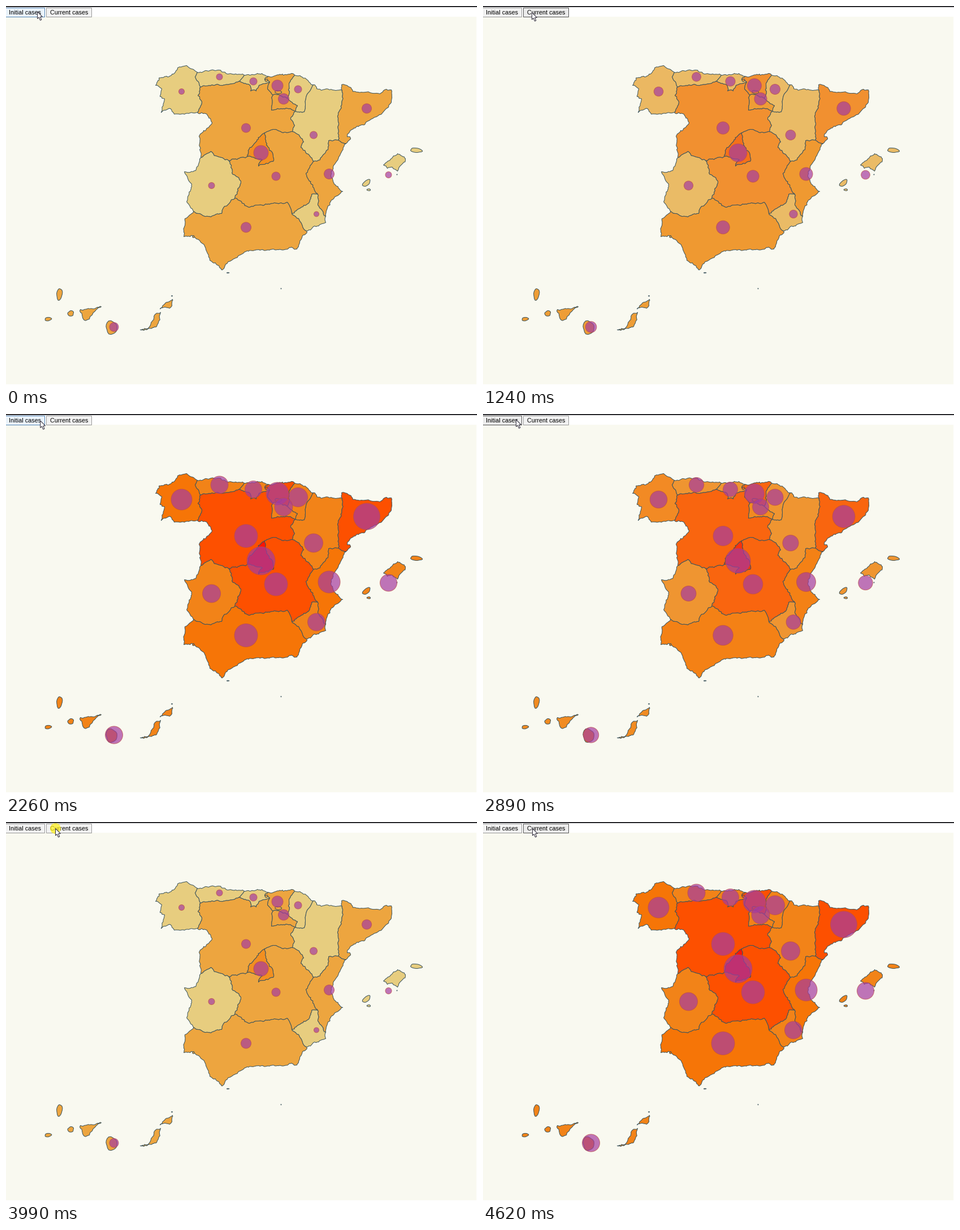
Recreate the animation shown at these times as a matplotlib script. Size 833 by 673 pixels, loop 5 s.

```python
import numpy as np
import matplotlib.pyplot as plt
from matplotlib.animation import FuncAnimation
from matplotlib.patches import Circle, Polygon, Rectangle

W, H, DPI = 833, 673, 64
PX = 72 / DPI
INTERVAL, LOOP = 20, 5000
TICK = 78.1

plt.rcParams["font.family"] = "Liberation Sans"
rng = np.random.default_rng(7)

SAND, AMBER, DEEP = (231, 205, 127), (237, 165, 63), (242, 143, 32)
ORANGE, TANGERINE, FLAME, RED = (242, 131, 24), (246, 117, 7), (253, 80, 0), (253, 20, 5)
BORDER = "#3c545c"

fig = plt.figure(figsize=(W / DPI, H / DPI), dpi=DPI, facecolor="white")
ax = fig.add_axes([0, 0, 1, 1])
ax.set_xlim(-0.5, W - 0.5)
ax.set_ylim(H - 0.5, -0.5)
ax.axis("off")


def ragged(points):
    """Split a polyline again and again, nudging each new point sideways."""
    pts = [np.array(p, float) for p in points]
    for _ in range(5):
        out = []
        for p, q in zip(pts, pts[1:]):
            out.append(p)
            dx, dy = q - p
            size = np.hypot(dx, dy)
            if size > 3.5:
                push = rng.normal() * min(0.13, 0.9 / size)
                out.append((p + q) / 2 + push * np.array([-dy, dx]))
        pts = out + [pts[-1]]
    return np.array(pts)


def pairs(xy):
    return list(zip(xy[::2], xy[1::2]))


def isle(*xy):
    return ragged(pairs(xy + xy[:2]))


def blob(x, y, w, h, tilt=0):
    a = np.linspace(0, 2 * np.pi, 20)
    r = 1 + sum(0.2 / k * np.sin(k * a + rng.uniform(0, 6)) for k in (2, 3, 5))
    p = (w * r * np.cos(a) + 1j * h * r * np.sin(a)) / 2 * np.exp(1j * np.radians(tilt))
    return np.column_stack([x + p.real, y + p.imag])


# Points where borders meet; an edge joins two of them, a region walks round several
NODES = dict(
    A=(338, 117), B=(344, 143), C=(338, 188), D=(421, 122), E=(411, 133), F=(463, 124),
    G=(466, 134), H=(472, 157), I=(510, 122), J=(497, 163), K=(511, 186), L=(543, 139),
    M=(506, 222), N=(594, 149), O=(587, 237), P=(601, 243), Q=(543, 275), R=(551, 333),
    S=(565, 372), T=(505, 367), U=(531, 398), V=(404, 340), W=(331, 363), X=(393, 273),
    Y=(344, 268), Z=(427, 266), a=(457, 224), b=(446, 283))
edges = {}


def edge(ends, *via):
    line = ragged([NODES[ends[0]], *pairs(via), NODES[ends[1]]])
    edges[ends], edges[ends[::-1]] = line, line[::-1]


def walk(path):
    return np.vstack([edges[p + q] for p, q in zip(path, path[1:] + path[0])])


edge("AC", 319, 105, 303, 109, 297, 119, 270, 127, 264, 140, 275, 146, 272, 160, 280, 164,
     274, 188, 290, 181, 297, 191)
edge("AB", 334, 125)
edge("BC", 339, 158, 346, 169)
edge("AD", 377, 113, 392, 120)
edge("DE")
edge("BE", 378, 140)
edge("DF", 452, 119)
edge("FG", 457, 130)
edge("EG", 430, 139, 432, 150, 442, 150, 447, 140)
edge("FI", 478, 122)
edge("GH", 462, 146)
edge("HJ", 484, 157)
edge("IJ", 500, 137)
edge("JK", 515, 176)
edge("HK", 469, 184, 498, 181)
edge("IL", 523, 125)
edge("LK", 530, 162, 527, 187)
edge("LN", 549, 146)
edge("KM", 503, 200, 510, 211)
edge("MQ", 518, 228, 526, 240, 521, 250)
edge("QO", 555, 272, 569, 254, 570, 238)
edge("NO", 595, 165, 587, 189)
edge("OP")
edge("NP", 593, 139, 607, 143, 613, 151, 661, 155, 669, 148, 681, 148, 681, 170, 660, 192,
     612, 218, 603, 231, 609, 235)
edge("PS", 578, 285, 574, 300, 580, 315, 595, 328, 572, 348)
edge("SR", 551, 352)
edge("RQ", 542, 320, 530, 296)
edge("RT", 540, 333, 536, 347)
edge("TU", 518, 378)
edge("US", 565, 383)
edge("VT", 425, 354, 497, 347)
edge("WU", 316, 376, 314, 408, 331, 408, 351, 425, 360, 450, 382, 467, 393, 452, 426, 433,
     492, 431, 501, 427, 514, 430)
edge("YW", 335, 291, 315, 293, 328, 315, 320, 348)
edge("WV", 362, 373, 381, 367, 384, 357)
edge("YX", 362, 257, 371, 265)
edge("XV", 401, 298, 415, 310)
edge("CY", 352, 190, 364, 206, 341, 230)
edge("XZ")
edge("aM", 472, 218, 490, 224)
edge("Za", 431, 250)
edge("ab", 460, 246, 469, 257, 473, 273)
edge("bZ", 453, 272)

areas, bubbles = [], []


def region(path, colors, x, y, small, big, *isles):
    group = []
    for pts in ([walk(path)] if path else []) + list(isles):
        patch = Polygon(pts, closed=True, ec=BORDER, lw=PX, joinstyle="round", zorder=2)
        group.append(ax.add_patch(patch))
    areas.append((group, np.array(colors) / 255))
    dot = Circle((x, y), small, fc=(0.647, 0.235, 0.627, 0.7), ec=(0.74, 0.3, 0.28, 0.7),
                 lw=PX, zorder=4)
    bubbles.append((ax.add_patch(dot), small, big))


region("ACB", (SAND, TANGERINE), 310, 151, 5, 18.5)
region("ADEB", (SAND, ORANGE), 377, 125, 5.5, 15.5)
region("DFGE", (SAND, ORANGE), 437, 133, 6.5, 15)
region("BEGHKMaZXYC", (AMBER, FLAME), 424, 215.5, 8, 20.5)
region("FIJHG", (AMBER, FLAME), 479.5, 140.5, 10, 20, blob(481, 152, 11, 6), blob(460, 131, 5, 4))
region("ILKJ", (SAND, ORANGE), 516, 147, 6.5, 17)
region("HJK", (AMBER, ORANGE), 490.5, 164, 9.5, 16)
region("LNOQMK", (SAND, ORANGE), 543.5, 228, 6.5, 16.5)
region("NPO", (AMBER, FLAME), 637.5, 181, 8.5, 23.5)
region("XZbaMQRTV", (AMBER, FLAME), 477, 301, 7.5, 20.5)
region("Zab", (DEEP, RED), 450.5, 259.5, 13, 25)
region("OPSRQ", (AMBER, TANGERINE), 571, 297, 9, 19.5)
region("YXVW", (SAND, ORANGE), 363, 317.5, 5.5, 16)
region("RTUS", (SAND, ORANGE), 548.5, 368, 4.5, 15.5)
region("WVTU", (AMBER, TANGERINE), 424, 391.5, 9, 20.5,
       blob(331, 408, 3, 4), blob(392, 472, 4, 1), blob(486, 500, 1, 1))
region("", (SAND, ORANGE), 676, 298.5, 5.5, 15,
       isle(667, 281, 692, 261, 706, 270, 692, 292, 683, 285, 674, 287),
       blob(725, 255, 20, 8, 10), blob(637, 313, 15, 9, -45),
       blob(641, 325, 7, 3), blob(691, 298, 1, 1))
region("", (AMBER, ORANGE), 190.5, 568, 8, 15.5,
       blob(94, 510, 10, 20), blob(74, 554, 12, 6, -15), blob(114, 544, 11, 9),
       blob(186, 569, 21, 22), blob(293, 513, 2, 1),
       isle(131, 537, 168, 532, 157, 540, 147, 554, 138, 556),
       isle(237, 573, 252, 569, 264, 545, 273, 542, 266, 567),
       isle(272, 536, 278, 529, 294, 519, 291, 533))

# Page and toolbar
ax.add_patch(Rectangle((-0.5, 18.5), 832, 651, fc="#f9f9f0", lw=0, zorder=0))
ax.add_patch(Rectangle((-1, -1), W + 1, 2.3, fc="#2a2a2e", lw=0, zorder=1))


def button(x, width, label, center):
    ax.text(center, 10.2, label, size=10.7 * PX, ha="center", va="center_baseline",
            color="black", zorder=6)
    return ax.add_patch(Rectangle((x, 2), width, 16, lw=PX, zorder=5))


initial = button(-3, 71, "Initial cases", 33)
current = button(71, 80, "Current cases", 111)
ARROW = np.array([(0, 0), (0, 12.5), (2.8, 10), (5, 15.3), (7.3, 14.3), (5, 9.2), (8.8, 9)])
glow = ax.add_patch(Circle((0, 0), 9.5, fc=(1, 0.94, 0.1, 0.72), lw=0, zorder=7))
pointer = ax.add_patch(Polygon(ARROW, closed=True, fc="white", ec="#2c2838", lw=PX, zorder=8))

MOVES = ((540, 6, (86, 11)), (1640, 7, (61, 12)), (2260, 3, (58, 9.5)),
         (3290, 7, (86, 11)), (3840, 1, (87, 11)))
CLICKS = ((930, 1090), (2580, 2740), (3990, 4070))
NORMAL, HOVER, FOCUS = ("#f2f2f2", "#9a9a9a"), ("#ececec", "#555555"), ("#eaf3fb", "#5585b5")


def ticks(t, start):
    """Whole redraws of the page since a start time."""
    return int((t - start + 8) // TICK)


def ease(t, start):
    n = ticks(t, start)
    if n < 0:
        return 0
    p = min((n * TICK + 40) / 500, 1)
    return 4 * p ** 3 if p < 0.5 else 1 - 4 * (1 - p) ** 3


def pointer_at(t):
    pos = np.array([55, 9.5])
    for start, steps, goal in MOVES:
        p = np.clip((ticks(t, start) + 1) / steps, 0, 1)
        pos = pos + (goal - pos) * p * p * (3 - 2 * p)
    return pos


def paint(box, style):
    box.set_facecolor(style[0])
    box.set_edgecolor(style[1])


def draw(i):
    t = i * INTERVAL + 10
    level = ease(t, 1090) - ease(t, 2740) + ease(t, 3990)
    for group, (low, high) in areas:
        for patch in group:
            patch.set_facecolor(np.clip(low + (high - low) * level, 0, 1))
    for dot, small, big in bubbles:
        dot.set_radius(small + (big - small) * level)

    pos = pointer_at(t)
    pointer.set_xy(ARROW + pos)
    glow.center = pos
    glow.set_visible(any(a <= t < b for a, b in CLICKS))
    paint(initial, FOCUS if t < 620 or 2260 <= t < 2740
          else HOVER if 2740 <= t < 3450 else NORMAL)
    paint(current, HOVER if 1090 <= t < 1720 or t >= 4070 else NORMAL)
    return []


anim = FuncAnimation(fig, draw, frames=LOOP // INTERVAL, interval=INTERVAL,
                     init_func=lambda: draw(0), repeat=True, repeat_delay=0, blit=False)
plt.show()
```
